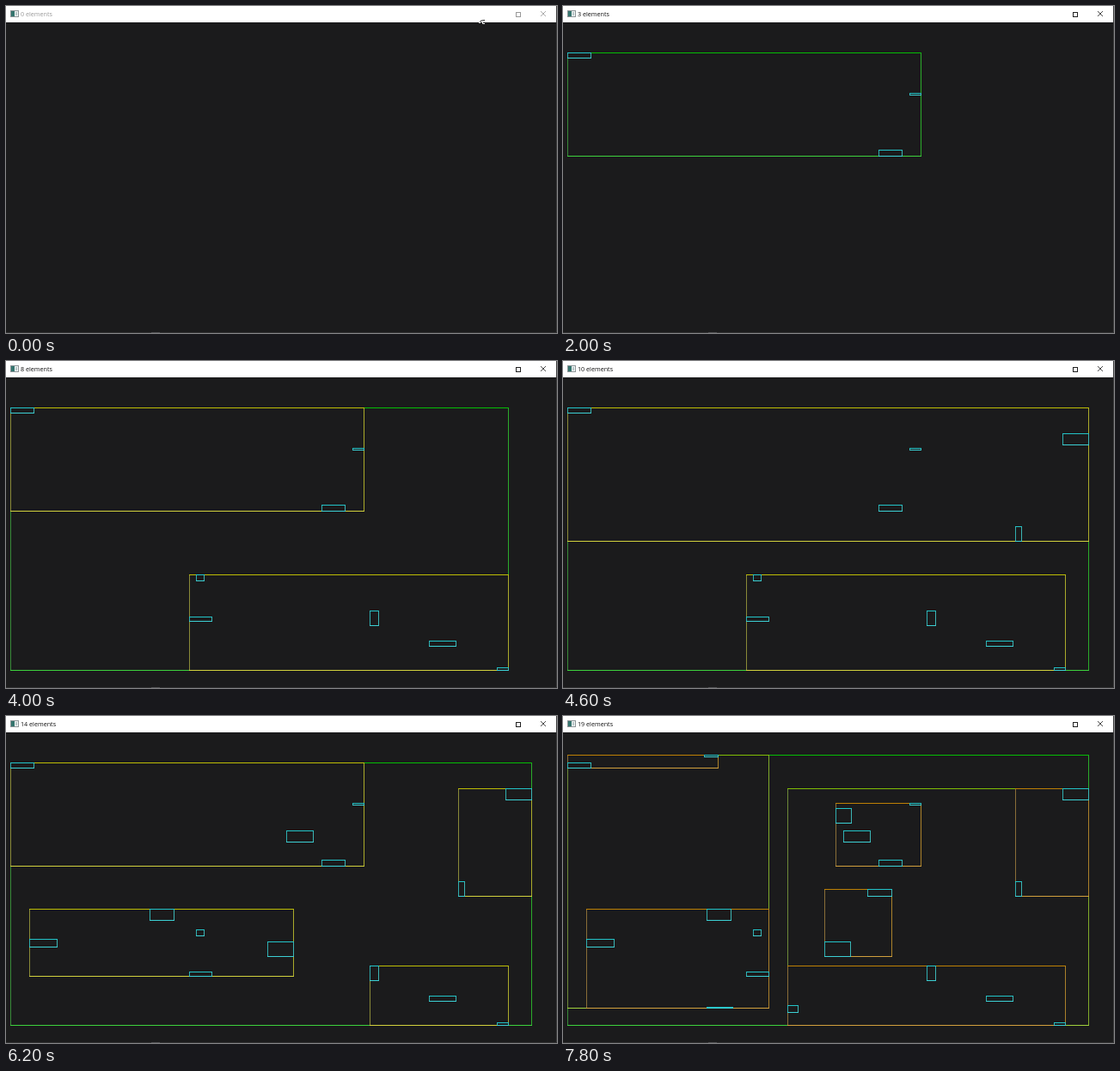
An HTML page with a canvas for the animation above (8000 ms loop, 641 by 380 pixels).

```html
<!DOCTYPE html>
<html lang="en">
<head>
<meta charset="utf-8">
<title>Tree of boxes</title>
<style>
  html, body { margin: 0; width: 100%; height: 100%; overflow: hidden; background: #1b1b1c; }
  canvas { display: block; }
</style>
</head>
<body>
<canvas id="stage" width="641" height="380"></canvas>
<script>
const ctx = document.getElementById('stage').getContext('2d');
const LOOP = 8000;

// Inserted boxes, in order: time, left, top, right, bottom.
const items = [
  [1000, 5, 54, 32, 60], [1400, 403, 101, 416, 103], [1800, 367, 167, 394, 174],
  [2200, 213, 297, 239, 302], [2800, 571, 356, 584, 359], [3200, 492, 325, 523, 331],
  [3600, 423, 290, 433, 307], [4000, 221, 248, 230, 255], [4400, 581, 84, 611, 97],
  [4600, 526, 192, 533, 209], [5000, 326, 133, 357, 146], [5400, 167, 224, 195, 237],
  [5800, 27, 259, 59, 268], [6200, 304, 262, 334, 279], [6600, 317, 107, 335, 124],
  [7000, 164, 45, 180, 47], [7200, 354, 201, 382, 209], [7600, 167, 338, 197, 339],
  [7800, 261, 336, 273, 344]
].map(([at, ...box]) => ({ at, box }));

// How the tree is split once it holds a given number of boxes.
const splits = [
  [17, [['AP', 'DHLMR'], ['BCKO', 'NQ', 'IJ', 'EFGS']]],
  [16, ['AP', 'BCKO', 'IJ', 'DHLMN', 'EFG']],
  [12, ['ABCKO', 'IJ', 'DHLMN', 'EFG']],
  [11, ['ABCK', 'IJ', 'DEFGH']],
  [6, ['ABCIJ', 'DEFGH']],
  [1, 'ABCDE']
];

function rect(color, x, y, w, h) {
  ctx.fillStyle = color;
  ctx.fillRect(x, y, w, h);
}

function frame([l, t, r, b], [top, right, bottom, left]) {
  rect(left, l, t, 1, b - t + 1);
  rect(right, r, t, 1, b - t + 1);
  rect(top, l, t, r - l + 1, 1);
  rect(bottom, l, b, r - l + 1, 1);
}

const shades = hue => [
  `hsl(${hue},95%,38%)`, `hsl(${hue},60%,42%)`,
  `hsl(${hue},62%,53%)`, `hsl(${hue},42%,38%)`
];
const itemShades = ['#22c4c8', '#3cb4b4', '#3cd0d4', '#30aeb0'];

const union = boxes => [0, 1, 2, 3].map(i =>
  Math[i < 2 ? 'min' : 'max'](...boxes.map(b => b[i])));

const depthOf = node => typeof node === 'string' ? 1 : 1 + depthOf(node[0]);

function members(node, count) {
  if (typeof node !== 'string') return node.flatMap(n => members(n, count));
  return [...node].map(c => c.charCodeAt(0) - 65)
    .filter(i => i < count).map(i => items[i].box);
}

function drawTree(root, count) {
  const levels = depthOf(root);
  let row = [root];
  for (let d = 0; d < levels; d++) {
    const colors = shades(120 - 120 * d / levels);
    row.forEach(n => frame(union(members(n, count)), colors));
    if (d < levels - 1) row = row.flat();
  }
}

function line(color, width, ...points) {
  ctx.strokeStyle = color;
  ctx.lineWidth = width;
  ctx.beginPath();
  points.forEach(([x, y], i) => i ? ctx.lineTo(x, y) : ctx.moveTo(x, y));
  ctx.stroke();
}

function drawIcon() {
  rect('#8e9698', 5, 5, 10, 8);
  rect('#f2f5f5', 6, 6, 8, 6);
  rect('#35756f', 6, 6, 4, 6);
  rect('#b9c7c8', 11, 7, 2, 4);
}

function drawPointer() {
  line('#222', 1, [551, 18.5], [553, 17], [557, 16.5]);
  line('#fff', 1, [550, 19.5], [552, 19.5]);
  line('#fff', 1, [557, 18.5], [554.5, 18.5], [554.5, 20.5], [557, 20.5]);
}

function drawWindow(count, active) {
  rect('#1b1b1c', 0, 0, 641, 380);
  rect('#fff', 0, 0, 640, 19);
  rect('#3c3c3d', 640, 0, 1, 380);
  rect('#303031', 0, 379, 641, 1);
  rect('#505052', 169, 379, 10, 1);
  drawIcon();
  ctx.font = '7.2px "Open Sans", "Noto Sans", sans-serif';
  ctx.fillStyle = active ? '#111' : '#999';
  ctx.fillText(`${count} elements`, 17, 12);
  const ink = active ? '#222' : '#999';
  frame([593, 7, 598, 12], [ink, ink, ink, ink]);
  line(ink, 0.8, [622, 6], [628, 12]);
  line(ink, 0.8, [628, 6], [622, 12]);
}

function draw(time) {
  const count = items.filter(i => i.at <= time).length;
  drawWindow(count, time >= 400);
  if (time < 1600) drawPointer();
  if (!count) return;
  drawTree(splits.find(([min]) => count >= min)[1], count);
  items.slice(0, count).forEach(i => frame(i.box, itemShades));
}

const start = performance.now();
function tick() {
  draw((performance.now() - start) % LOOP);
  requestAnimationFrame(tick);
}
tick();
</script>
</body>
</html>
```
